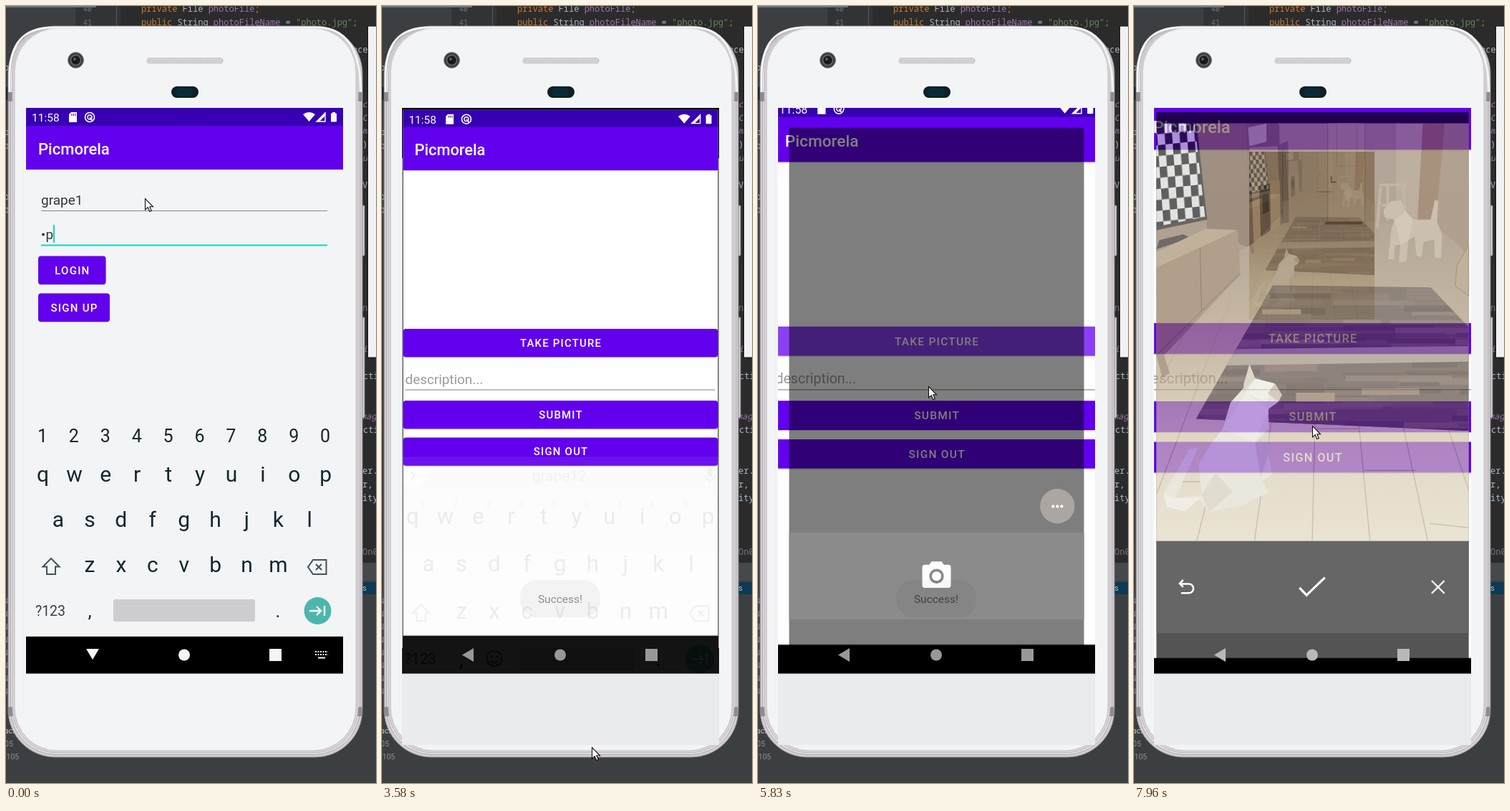
Animation of 517 by 1083 pixels, one loop 8000 ms. Source, as an HTML page:

```html
<!DOCTYPE html>
<html lang="en">
<head>
<meta charset="utf-8">
<title>Phone demo</title>
<style>
html, body { margin: 0; width: 100%; height: 100%; overflow: hidden; background: #3c3f41; }
svg { display: block; width: 517px; height: 1083px; font-family: Roboto, sans-serif; }
.code { font-family: "Noto Sans Mono", "DejaVu Sans Mono", monospace; white-space: pre; }
.mid { text-anchor: middle; }
.btn { font-weight: 500; letter-spacing: 1.25px; text-anchor: middle; }
.title { font-weight: 500; }
</style>
</head>
<body>
<script>
const LOOP = 8000;
const INK = '#16262e', PURPLE = '#6200ee', DARK = '#3700b3', LIT = '#8a3ff4', TEAL = '#12d6c3';
const APP = 'Picmorela', USER = 'grape1';

const rect = (x, y, w, h, fill, more = '') =>
  `<rect x="${x}" y="${y}" width="${w}" height="${h}" fill="${fill}" ${more}/>`;
const text = (x, y, size, str, fill, more = '') =>
  `<text x="${x}" y="${y}" font-size="${size}" fill="${fill}" ${more}>${str}</text>`;
const poly = (points, fill, more = '') => `<polygon points="${points}" fill="${fill}" ${more}/>`;
const circle = (x, y, r, fill, more = '') => `<circle cx="${x}" cy="${y}" r="${r}" fill="${fill}" ${more}/>`;
const line = (d, stroke, width = 1, more = '') =>
  `<path d="${d}" fill="none" stroke="${stroke}" stroke-width="${width}" ${more}/>`;
const group = (id, body, more = '') => `<g id="${id}" ${more}>${body}</g>`;

let seed = 7;
const random = () => (seed = (seed * 16807) % 2147483647) / 2147483647;

function editor() {
  const grey = '#a9b7c6', violet = '#9876aa', orange = '#cc7832';
  const right = [[484, 65, 'nce', grey], [498, 141, 'c', violet], [498, 160, 'C', violet], [498, 178, 'm', violet],
    [498, 197, ')', grey], [498, 216, 'u', violet], [498, 254, 'V', grey], [498, 425, 'n', '#72737a'],
    [498, 482, 'i', violet], [499, 520, 'cti', grey], [496, 576, 'mag', violet], [499, 595, 'cti', grey],
    [498, 652, 'er.', grey], [498, 671, 'r,', grey], [498, 690, 'ity', grey], [498, 765, 'On0', '#72737a']];
  const left = [90, 180, 199, 270, 288].map(y => text(-3, y, 12, 'o', '#a9b7c6', 'class="code"')).join('');
  const tree = [...Array(8)].map((_, i) => text(-4, 833 + i * 18, 11, 'N', violet, 'class="code"')).join('');
  return rect(0, 0, 517, 1083, '#3c3f41') + rect(97, 0, 63, 776, '#313335') + rect(160, 0, 357, 776, '#2b2b2b') +
    rect(0, 0, 126, 2, '#647c88') + rect(0, 113, 5, 18, '#0d293e') + line('M154.5 0V30', '#55585a') +
    rect(490, 776, 27, 25, '#45494b') + rect(490, 803, 27, 17, '#0d3a54') + text(498, 815, 11, 's', '#bbb') +
    text(108, 8, 10, '40', '#707578', 'class="code"') + text(108, 27, 10, '41', '#707578', 'class="code"') +
    text(189, 8, 12, `<tspan fill="${orange}">private </tspan>File <tspan fill="${violet}">photoFile</tspan><tspan fill="${orange}">;</tspan>`, grey, 'class="code"') +
    text(189, 27, 12, `<tspan fill="${orange}">public </tspan>String <tspan fill="${violet}">photoFileName</tspan> = <tspan fill="#6a8759">"photo.jpg"</tspan><tspan fill="${orange}">;</tspan>`, grey, 'class="code"') +
    right.map(([x, y, s, c]) => text(x, y, 12, s, c, 'class="code"' + (c === violet ? ' font-style="italic"' : ''))).join('') +
    left + tree + text(-2, 1014, 10.5, 'ack', '#c0c4c6') + text(-2, 1032, 10.5, '05', '#8b9194') + text(-2, 1050, 10.5, ':105', '#8b9194') +
    rect(505.5, 28, 14, 462, '#f1f1f1', 'stroke="#111"');
}

function shell() {
  const body = (i, r) => `<rect x="${3 + i}" y="${28 + i / 3}" width="${495 - 2 * i}" height="${1019 - i * 1.33}" rx="${r}"`;
  const band = y => rect(3, y, 9, 13, '#8f8b90') + rect(488.5, y, 9, 13, '#8f8b90');
  const holes = [...Array(25)].map((_, i) => line(`M${200 + i * 4.2} 78l2-3`, '#b4b4b8', .8)).join('');
  return rect(351, 27, 11, 6, '#77777a') +
    rect(496, 278, 5, 70, '#d5d2d5', 'stroke="#88858a" rx="1"') + rect(496, 434, 5, 140, '#d5d2d5', 'stroke="#88858a" rx="1"') +
    body(0, 66) + ' fill="#d2ced1" stroke="#8e8a90"/>' + body(3.5, 64) + ' fill="#e7e3e6" stroke="#aaa6ab"/>' +
    band(120) + band(977) + body(6, 62) + ' fill="#d6d2d5" stroke="#bbb7bb"/>' + body(9, 60) + ' fill="#f2f4f6" stroke="#c4c2c6"/>' +
    line('M5 120V95Q6 30 65 30H435Q495 30 496 120', '#f2f4f6', 3) +
    circle(97.5, 75.5, 11, '#3a3c40', 'stroke="#888"') + circle(97.5, 75.5, 7, '#17191c', 'stroke="#5c5e62" stroke-width="2"') + circle(96, 74, 2, '#55606a') +
    rect(197, 72.5, 106, 7.5, '#d4d4d7', 'rx="3" stroke="#bcbcc0" stroke-width=".7"') + holes +
    rect(231, 112, 38, 16, '#0d1f28', 'rx="8"') + rect(237, 114, 24, 12, '#0a2a38', 'rx="5"') + line('M24.5 142V985', '#eceef0');
}

function header(y) {
  return rect(28, 142, 443, 25, DARK) + rect(28, 166 + y, 443, 61, PURPLE) +
    text(36, 161, 15.5, '11:58', '#fff') +
    poly('91,148 99,148 99,162 88,162 88,151', '#fff') + line('M92 150v3M94.500 150v3M97 150v3', DARK) +
    circle(117, 155, 6.5, 'none', 'stroke="#fff" stroke-width="1.6"') + circle(117, 155, 3, 'none', 'stroke="#fff" stroke-width="1.4"') + line('M117 155l4 5', '#fff', 1.6) +
    `<path d="M415 151q8.500-6 17 0l-8.500 10z" fill="#fff"/>` + poly('446,149 446,161 434,161', 'none', 'stroke="#fff" stroke-width="1.4"') +
    poly('446,149 446,153 438,161 434,161', '#fff') + rect(454, 149.500, 8, 12, '#fff', 'rx="1"') + rect(456, 148, 4, 2, '#fff') +
    text(44 + y, 205.500 + y, 22, APP, '#fff', 'class="title"');
}

const button = (id, x, y, w, label) => rect(x, y + 1.5, w, 39, '#000', 'rx="4" opacity=".22"') +
  rect(x, y, w, 39.5, PURPLE, `id="${id}" rx="4"`) + text(x + w / 2 + .6, y + 25, 15, label, '#fff', 'class="btn"');

function login() {
  return rect(28, 142, 443, 737, '#f2f4f6') +
    group('patchSmall', rect(57, 304, 393, 269, '#fff') + rect(57, 573, 393, 304, '#e9edf0')) +
    group('patchLarge', rect(48, 256, 402, 30, '#fff') + rect(35, 278, 429, 295, '#fff') + rect(35, 573, 429, 285, '#e9edf0')) +
    header(1) + rect(28, 878, 443, 1, '#c8c8c8') +
    text(49, 276.5, 19, '', '#363636', 'id="user"') + text(49, 325, 19, '', '#363636', 'id="typed"') +
    group('dots', [...Array(7)].map((_, i) => circle(52 + i * 6.6, 318.5, 1.9, '#333')).join('')) +
    rect(49, 285, 400, 1, '#888', 'id="lineUser"') + rect(49, 333, 400, 1, '#888', 'id="linePass"') +
    rect(49, 279, 68, 1, '#444', 'id="composing"') + rect(0, 0, 2, 25, TEAL, 'id="caret"') +
    button('btnLogin', 45, 348.5, 94.5, 'LOGIN') + button('btnSignUp', 45, 400.5, 100, 'SIGN UP');
}

function keyboard() {
  const step = 43.9;
  const row = (keys, x, y, size) => [...keys].map((k, i) => text(x + i * step, y, size, k, INK, 'class="mid"')).join('');
  const hints = [...'1234567890'].map((k, i) => text(65 + i * step, 641, 11.5, k, '#70777b', 'class="mid"')).join('');
  return rect(28, 573, 443, 306, '#e9edf0', 'id="keyBack"') +
    group('digits', row('1234567890', 51, 608, 25)) +
    group('strip', rect(35, 574, 429, 48, '#e0e4e7') + circle(52.5, 599, 16.5, '#c5c9cc') + circle(52.5, 598, 16.5, '#fff') +
      line('M49.500 593l5 5-5 5', '#555', 2) + text(248, 605.5, 20, '', '#6a7074', 'class="mid" id="suggestion"') +
      rect(446, 588, 6.5, 12, '#586268', 'rx="3.2"') + line('M443 597q0 7 6.200 7t6.200-7M449.200 604v4', '#586268', 1.7) + hints) +
    row('qwertyuiop', 51.5, 663, 30) + row('asdfghjkl', 73, 726, 30) + row('zxcvbnm', 117, 789, 30) +
    line('M63 770L51.500 781.500H57V792H69V781.500H74.500Z', '#45525a', 2) +
    line('M429 772H447.500V792H429L422 782ZM433 778l8 8M441 778l-8 8', '#45525a', 2) +
    text(62, 849.5, 19.5, '?123', '#37444b', 'class="mid"') + text(117, 852, 26, ',', INK, 'class="mid"') + text(380, 852, 26, '.', INK, 'class="mid"') +
    group('smiley', circle(161, 842, 10, 'none', 'stroke="#45525a" stroke-width="1.8"') + circle(157.5, 839.500, 1.6, '#45525a') + circle(164.500, 839.500, 1.6, '#45525a') + line('M155.500 844q5.500 7 11 0', '#45525a', 1.8)) +
    rect(150, 827, 198, 31, '#cdccd0', 'id="space" rx="3"') + circle(435.5, 843, 19, '#4db6ac') +
    line('M424 843h16M434 837l6 6-6 6M445 836v14', '#fff', 2.4);
}

function mainPage() {
  return rect(28, 142, 443, 738, '#fefefe') + header(0) + rect(28, 227, 443, 1, '#ddd') + rect(28, 879, 443, 1, '#bbb') +
    `<use id="thumb" href="#scene" transform="translate(168 229.400) scale(.364) translate(-28 -158)"/>` +
    button('btnTake', 28, 449.5, 443, 'TAKE PICTURE') + text(31, 526.5, 19, 'description...', '#9b9b9b') + rect(31, 534.5, 436, 1, '#808080') +
    button('btnSubmit', 28, 550, 443, 'SUBMIT') + button('btnOut', 28, 602, 443, 'SIGN OUT');
}

function scene() {
  const planks = [-6, -5, -4, -3, -2, -1, 0, 1, 2, 3, 4, 5, 6].map(k => line(`M265 60L${249 + k * 82} 749`, '#9c8a6c', 1.5, 'opacity=".65"')).join('');
  const joints = line('M248 590H315M323 649H396M416 724L471 730M120 665H60M150 365H190M225 332H260M300 345H345M350 372H390M190 318H230M110 440L150 442M60 515H110', '#9c8a6c', 1.5, 'opacity=".7"');
  const shades = ['#45372d', '#57463a', '#665345', '#4d3e33', '#735f4f'];
  let rug = '';
  for (let y = 388; y < 594; y += 9)
    for (let x = 84; x < 471; x += 90) rug += rect(x + random() * 40, y + random() * 5, 50 + random() * 110, 5 + random() * 6, shades[Math.floor(random() * 5)], 'opacity=".75"');
  return rect(28, 158, 443, 591, '#8a745d') +
    rect(200, 158, 175, 141, '#8d7963') + rect(271, 158, 53, 140, '#97836b', 'stroke="#6d5a47"') + rect(284, 158, 28, 60, 'none', 'stroke="#847059"') + line('M276 233v8h7', '#50402f', 2) +
    poly('368,158 410,158 404,298 368,298', '#9c8972') + poly('406,158 438,158 424,300 398,300', '#7e5c3c') + poly('437,158 471,158 471,340 424,300', '#8b7259') +
    poly('84,158 157,158 162,335 100,308', '#715943') + poly('155,158 202,158 206,302 161,331', '#665241') +
    poly('158,164 184,158 184,184 160,190', '#a39683') + poly('160,192 200,190 202,240 162,244', '#8d7a64') +
    poly('163,242 203,238 206,302 166,328', '#9a8468') + poly('174,246 189,243 190,309 176,319', '#50443a') + poly('178,260 187,257 188,282 179,287', '#241f1b') +
    poly('202,188 215,183 216,298 204,302', '#65594d') + line('M207 192v100', '#463c33') +
    poly('162,330 208,299 421,299 471,345 471,749 28,749 28,400', 'url(#floor)') +
    `<g clip-path="url(#floorClip)">${planks}${joints}</g>` +
    poly('268,297 320,297 320,301 266,301', '#50402f') +
    poly('28,158 85,158 100,294 28,309', '#201b17') + poly('28,158 82,158 97,290 28,304', 'url(#checks)') +
    poly('32,323 66,315 77,320 28,336', '#2a231d') + poly('28,340 98,307 143,309 28,362', '#a58b69') +
    poly('28,362 143,309 147,372 39,486 47,512 36,517 28,486', '#8b7052') + line('M28 486L147 370M90 334L92 424', '#594530') +
    poly('454,360 471,330 471,402 452,388', '#a38b6b', 'stroke="#725c45"') +
    line('M344 245H382M346 248L341 307M378 248L382 300M347 274H374M356 246V295', '#a6927a', 4) +
    `<g clip-path="url(#rugClip)">${rect(84, 386, 387, 208, '#59483b')}${rug}${poly('84,478 471,473 471,495 84,501', '#9c8c7b')}${rect(178, 421, 55, 7, '#907b64')}${rect(226, 539, 55, 13, '#8b7258')}${rect(319, 533, 82, 9, '#806a54')}</g>` +
    poly('350,281 361,268 375,267 382,283 392,294 417,294 423,266 428,268 426,297 433,315 432,348 423,349 422,322 407,326 404,347 397,345 394,318 385,324 383,353 372,355 374,329 366,331 365,350 357,350 361,309 366,294 352,291', '#b3a18a') +
    poly('366,294 382,283 392,294 385,324 374,329', '#c0af98') +
    poly('160,499 168,519 196,526 206,542 201,552 187,562 187,625 192,655 179,664 187,680 149,699 103,708 90,690 68,707 43,701 38,682 75,619 87,617 55,688 92,684 88,640 105,612 122,590 133,553 152,532', '#e1dccd') +
    poly('160,499 168,519 151,538 152,526', '#cec5b1') + poly('168,519 196,526 184,552 155,540', '#ece8dc') + poly('92,684 112,652 136,679 103,708', '#d3ccba') +
    poly('122,590 155,540 187,562 168,610', '#e9e5d9') + poly('168,610 187,590 187,625 176,660', '#cfc7b4') + poly('38,682 55,688 90,688 68,707 43,701', '#ebe6d9') + poly('186,540 196,526 206,542 201,552', '#bfb39d');
}

function camera() {
  const shutter = rect(228, 797, 43, 34.500, '#fff', 'rx="4"') + poly('237,799 242,792 257,792 262,799', '#fff') + circle(249.5, 814, 9, '#fff', 'stroke="#1c1c1c" stroke-width="4"');
  const review = line('M66 804l-5 5 5 5M61 809.500H74a6.500 6.500 0 0 1 0 13H63', '#fff', 2.6) + line('M231 815l10 10.500 26-25', '#fff', 3.2) + line('M418.500 805l18 18M436.500 805l-18 18', '#fff', 2.4);
  return rect(28, 142, 443, 788, '#000') + `<use id="view" href="#scene"/>` + rect(28, 158, 443, 591, '#000', 'id="dim"') +
    rect(28, 749, 443, 130, '#1b1b1b') +
    group('shoot', circle(431, 709, 26, '#8a7c6e', 'opacity=".65"') + [424.5, 431, 437.5].map(x => circle(x, 709.5, 2.3, '#fff')).join('') + shutter) +
    group('review', review);
}

const navBar = poly('112,896 130,896 121,911', 'inherit', 'id="navDown"') + poly('128,895 128,914 112,904.5', 'inherit', 'id="navBack"') +
  circle(249, 904.5, 8, 'inherit') + rect(368, 896, 17, 17, 'inherit') +
  group('navKeys', line('M432 900H450M432 904H450', 'currentColor', 2, 'stroke-dasharray="2 1.5"') + line('M436 908.500H446', 'currentColor', 2));

document.body.innerHTML = `<svg viewBox="0 0 517 1083"><defs>
  <clipPath id="screen"><rect x="28" y="142" width="443" height="788.500"/></clipPath>
  <clipPath id="floorClip"><polygon points="162,330 208,299 421,299 471,345 471,749 28,749 28,400"/></clipPath>
  <clipPath id="rugClip"><polygon points="193,387 417,390 471,446 471,593 84,576"/></clipPath>
  <linearGradient id="floor" x2="0" y2="1"><stop stop-color="#8f7b63"/><stop offset=".4" stop-color="#b19c7d"/><stop offset=".7" stop-color="#d5c8ac"/><stop offset="1" stop-color="#e0d7c0"/></linearGradient>
  <pattern id="checks" width="21" height="31" patternUnits="userSpaceOnUse" patternTransform="translate(28 158) skewY(-6) skewX(4)"><rect width="21" height="31" fill="#d5d5d2"/><path d="M0 0h10.500v31h10.500v-15.500h-21z" fill="#111"/></pattern>
  <g id="scene">${scene()}</g></defs>` +
  editor() + shell() + rect(28, 930, 443, 100, '#e9ebed', 'id="chin"') +
  `<g clip-path="url(#screen)">` + rect(28, 142, 443, 789, '#000') +
  group('login', login()) + group('main', mainPage()) + group('edges', line('M28.500 212V895M470.500 212V895', '#999')) +
  group('toast', rect(193, 800, 112, 52, '#f1f1f1', 'rx="24"') + text(249, 832, 15.500, 'Success!', '#6c6c6c', 'class="mid"')) +
  group('keys', keyboard()) + group('camera', camera()) + group('nav', navBar) + '</g>' +
  group('window', rect(2.5, 1063.5, 498, 24, '#f2f2f2', 'stroke="#111"') + rect(53, 1081, 3, 2, '#444')) +
  group('mouse', line('M0 0V15.500L3.700 12.200L6.300 18L8.800 17L6.300 11.300H11Z', '#111', 1.1, 'style="fill:#fff"')) + '</svg>';

const $ = id => document.getElementById(id);
const set = (id, attrs) => { for (const k in attrs) $(id).setAttribute(k, attrs[k]); };
const show = (id, on) => set(id, { display: on ? 'inline' : 'none' });
const at = (t, steps) => steps.reduce((now, s) => (t >= s[0] ? s : now)).slice(1);

// [time, x, y] of the pointer tip
const pointer = [[0, 194, 268], [2140, 188, 290], [2260, 170, 360], [2380, 154, 420], [2530, 142, 418], [2650, 129, 416],
  [3190, 150, 440], [3310, 330, 580], [3460, 318, 830], [3580, 293, 1033], [3730, 288, 1053], [3850, 282, 1010], [3970, 272, 920],
  [4090, 265, 859], [4240, 237, 843], [4390, 249, 841], [4510, 259, 838], [4660, 261, 795], [4780, 258, 705], [4900, 252, 600],
  [5020, 248, 519], [5170, 240, 484], [5290, 236, 465], [5830, 238, 530], [5950, 242, 650], [6070, 245, 760], [6190, 246, 803],
  [6880, 236, 745], [7000, 216, 640], [7120, 204, 559], [7270, 204, 570], [7420, 262, 783], [7570, 260, 811], [7840, 258, 760], [7960, 249, 585]];
// [time, scale, opacity]
const mainSteps = [[0, 1, 0], [3460, .96, .6], [3580, .993, 1], [3730, 1, 1], [5830, 1.03, 1], [6070, 1, 0], [7840, 1.1, 1], [7960, 1.085, 1]];
const cameraSteps = [[0, 1, 0], [5830, .93, .5], [5950, 1, 1], [7840, .995, .9], [7960, .985, .667]];
// [time, scale, shift, opacity]
const keySteps = [[0, 1, 0, 1], [3460, 1.01, 7, .6], [3580, 1.045, 29.6, .08], [3730, 1, 0, 0]];
const passSteps = [[0, 1, 'p', 66], [120, 2, 'a', 73], [240, 3, 's', 79], [360, 4, 's', 86], [780, 7, '', 93]];
const navColors = [[0, '#f5f5f5'], [120, '#e4e4e4'], [240, '#d4d4d4'], [360, '#c4c4c4'], [510, '#b4b4b4'], [630, '#a4a4a4'], [780, '#989898'], [7960, '#b8b8b8']];

function layer(id, scale, opacity) {
  show(id, opacity > 0);
  set(id, { opacity, transform: `translate(249.5 538) scale(${scale}) translate(-249.5 -538)` });
}

function draw(t) {
  const onUser = t >= 1510, leaving = t >= 3460;

  const [dots, letter, passCaret] = at(t, passSteps);
  const name = USER + (t >= 2140 ? '2' : '');
  [...$('dots').children].forEach((d, i) => d.setAttribute('display', i < dots ? 'inline' : 'none'));
  $('typed').textContent = letter;
  set('typed', { x: 49 + dots * 6.6 });
  $('user').textContent = name;
  $('suggestion').textContent = t >= 1630 ? name : '';
  set('lineUser', onUser ? { height: 2, y: 284.5, fill: TEAL } : { height: 1, y: 285, fill: '#888' });
  set('linePass', onUser ? { height: 1, y: 333, fill: '#999' } : { height: 2, y: 332.5, fill: TEAL });
  set('composing', { width: t >= 2140 ? 68 : 57 });
  show('composing', onUser);
  set('caret', onUser ? { x: t >= 2140 ? 116.5 : 106, y: 257 } : { x: passCaret, y: 305 });
  show('caret', !(t >= 1360 && t < 1510) && !(t >= 2530 && t < 3040));
  show('patchSmall', t >= 120);
  show('patchLarge', onUser);
  set('btnSignUp', { fill: t >= 2800 && t < 3460 ? LIT : PURPLE });
  show('login', t < 3580);

  const [keyScale, keyShift, keyOpacity] = at(t, keySteps);
  show('keys', keyOpacity > 0);
  set('keys', { opacity: keyOpacity, transform: `translate(${249.5 * (1 - keyScale)} ${keyShift}) scale(${keyScale})` });
  show('keyBack', leaving);
  show('digits', !onUser);
  show('strip', onUser);
  show('smiley', onUser);
  set('space', onUser ? { x: 194, width: 154, fill: '#c9cdd0' } : { x: 150, width: 198, fill: t < 120 ? '#cdccd0' : '#c9cdd0' });

  layer('main', ...at(t, mainSteps));
  show('edges', t >= 3580 && t < 3730);
  show('thumb', t >= 7840);
  set('btnTake', { fill: t >= 5440 && t < 6070 ? LIT : PURPLE });
  show('toast', t >= 3580 && t < 5950);
  set('toast', { opacity: t < 3730 ? .8 : 1 });

  layer('camera', ...at(t, cameraSteps));
  show('view', t >= 6070);
  set('dim', { opacity: t >= 6580 && t < 7840 ? .1 : t >= 6460 && t < 6580 ? .2 : 0 });
  show('shoot', t < 6580);
  show('review', t >= 6730);

  const [navColor] = at(t, navColors);
  set('nav', { fill: navColor, color: navColor });
  show('navDown', t < 3580);
  show('navBack', t >= 3580);
  show('navKeys', t < 3580);
  show('chin', leaving);
  show('window', t >= 5950 && t < 7840);

  const [x, y] = at(t, pointer);
  set('mouse', { transform: `translate(${x + .5} ${y + .5})` });
}

const start = performance.now();
function tick() {
  draw((performance.now() - start) % LOOP);
  requestAnimationFrame(tick);
}
tick();
</script>
</body>
</html>
```
